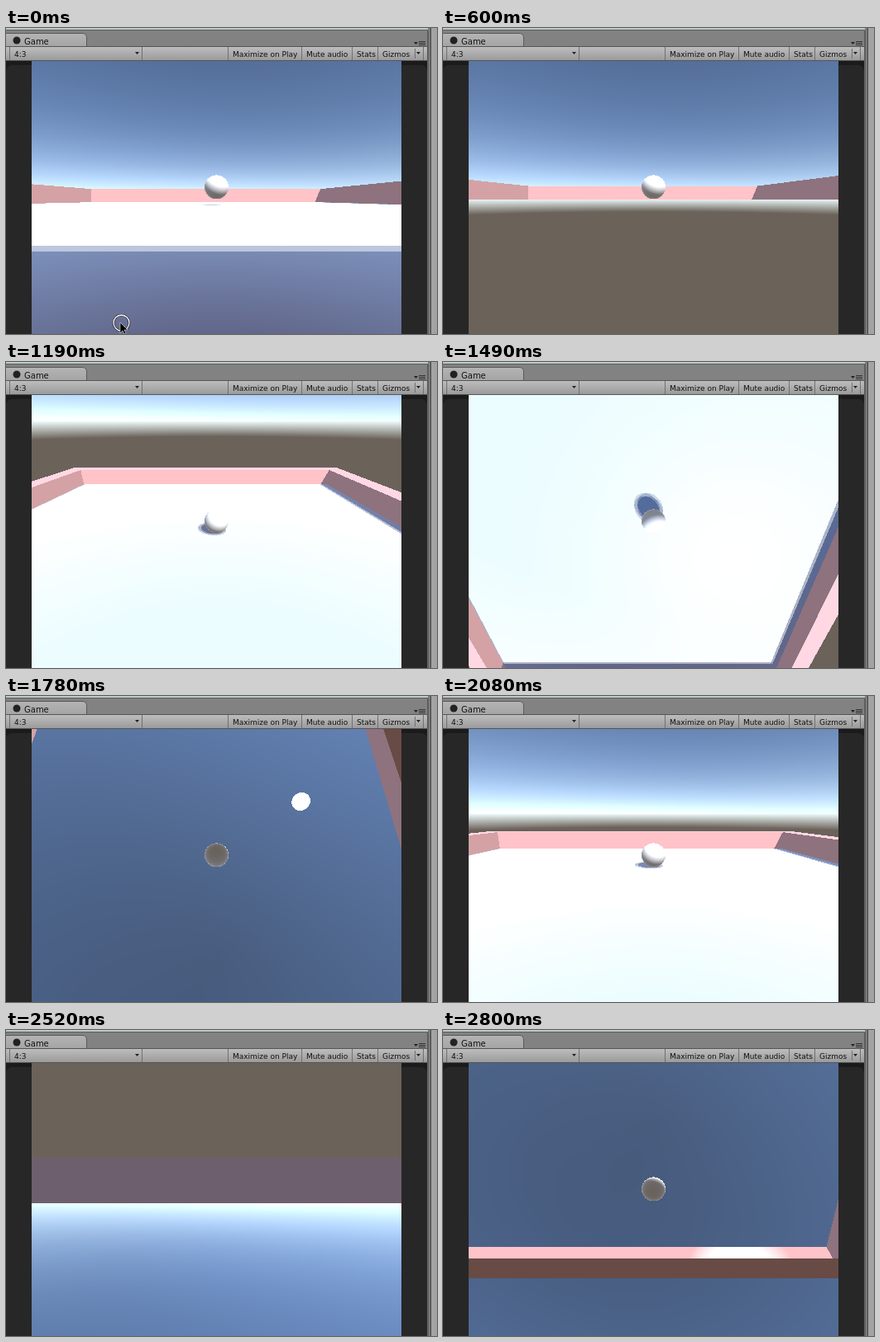
These frames come from a looping animation (521x371 px, 2.85 s). An HTML page with a canvas:

```html
<!DOCTYPE html>
<html lang="en">
<head>
<meta charset="utf-8">
<title>Rolling ball</title>
<style>
html, body { margin: 0; width: 100%; height: 100%; overflow: hidden; background: #262626; }
svg, canvas { position: absolute; left: 0; top: 0; }
canvas { left: 31px; top: 40px; }
text { font: 9px "DejaVu Sans", sans-serif; fill: #111; }
</style>
</head>
<body>
<svg width="521" height="371">
  <defs>
    <linearGradient id="bar" x2="0" y2="1"><stop stop-color="#bdbdbd"/><stop offset="1" stop-color="#9b9b9b"/></linearGradient>
    <linearGradient id="tab" x2="0" y2="1"><stop stop-color="#b4b4b4"/><stop offset="1" stop-color="#a4a4a4"/></linearGradient>
  </defs>
  <rect width="521" height="371" fill="#828282"/>
  <rect width="510" height="2" fill="#bccac5"/>
  <rect y="2" width="510" height="1" fill="#5c5c5c"/>
  <path d="M-1 23V6.500H92Q97.500 6.500 97.500 12V23Z" fill="url(#tab)" stroke="#5a5a5a"/>
  <circle cx="13" cy="15" r="4.500" fill="#222"/>
  <text x="22" y="20" style="font-size:10px">Game</text>
  <path d="M493 17h5l-2.500 3z" fill="#222"/>
  <path d="M499 16.500h8M499 18.500h8M499 20.500h8" stroke="#333"/>
  <rect y="23" width="510" height="16" fill="url(#bar)"/>
  <path d="M0 22.500H510M0 39.500H510" stroke="#555"/>
  <path d="M4.500 23V39M164.500 23V39M268.500 23V39M357.500 23V39M418.500 23V39M449.500 23V39M494.500 25V37M504.500 23V39" stroke="#707070"/>
  <path d="M156 29h5l-2.500 3zM496 29h5l-2.500 3z" fill="#222"/>
  <text x="10" y="35">4:3</text>
  <text x="274" y="35">Maximize on Play</text>
  <text x="363" y="35">Mute audio</text>
  <text x="424" y="35">Stats</text>
  <text x="455" y="35">Gizmos</text>
  <rect y="40" width="510" height="331" fill="#1b1b1b"/>
  <rect y="45" width="509" height="340" rx="7" fill="#272727"/>
  <rect x="509" y="3" width="2" height="368" fill="#5f5f5f"/>
  <rect x="511" width="3" height="371" fill="#7a7a7a"/>
  <rect x="513" width="1" height="371" fill="#444"/>
  <rect x="514" width="7" height="371" fill="#a3a3a3"/>
</svg>
<canvas id="view" width="447" height="331"></canvas>
<svg id="pointer" width="521" height="371">
  <circle cx="139.500" cy="357.500" r="9.500" fill="none" stroke="#222" stroke-width="2.500"/>
  <circle cx="139.500" cy="357.500" r="9.500" fill="none" stroke="#fff" stroke-width="1.300"/>
  <path d="M138 357v13l3-3 2 4 2-1-2-4h4z" fill="#000" stroke="#ddd" stroke-width=".6"/>
</svg>
<script>
// The camera is fixed to the ball, so it tumbles around it as the ball rolls.
const LOOP = 2850, FOCAL = 290, CX = 254.5, CY = 207.5;
const SIDE = 9.1, FAR = 9.1, BACK = -9.55, WALL = 1.05;
const BALL_X = 0.85, RADIUS = 0.5, NEAR = 0.3, BLUR = 0.07;
const SUN = [0.321, 0.766, -0.557];

// start ms, roll in degrees, ball z, height above the floor
const steps = [
  [0, 0, 0.05, 0.24], [150, 0, 0.05, 0], [1040, 4.7, 0.1, 0],
  [1190, 25, 0.5, 0], [1340, 65, 1.2, 0], [1490, 120, 2, 0],
  [1630, 184, 2.4, 0], [1780, 249.3, 2.75, 0], [1930, 311, 3.1, 0],
  [2080, 372.5, 3.54, 0], [2220, 428, 4.2, 0], [2370, 484, 4.9, 0],
  [2520, 540, 5.65, 0], [2670, 596, 5.9, 0], [2800, 648, 6.1, 0]
];

const OUT = SIDE + 1;
const walls = [
  [-OUT, 0, FAR, OUT, WALL, FAR + 1], [-OUT, 0, BACK - 1, OUT, WALL, BACK],
  [-OUT, 0, BACK, -SIDE, WALL, FAR], [SIDE, 0, BACK, OUT, WALL, FAR]
];

const dot = (a, b) => a[0] * b[0] + a[1] * b[1] + a[2] * b[2];
const clamp = x => Math.min(1, Math.max(0, x));
const mix = (a, b, k) => a.map((x, i) => x + (b[i] - x) * k);
const along = (o, d, t) => [o[0] + d[0] * t, o[1] + d[1] * t, o[2] + d[2] * t];
const unit = v => along([0, 0, 0], v, 1 / Math.hypot(v[0], v[1], v[2]));

let ball, enter, leave, axis;

function hitBox(b, o, d) {
  enter = -1e9;
  leave = 1e9;
  for (let i = 0; i < 3; i++) {
    const u = (b[i] - o[i]) / d[i], v = (b[i + 3] - o[i]) / d[i];
    const lo = Math.min(u, v), hi = Math.max(u, v);
    if (lo > enter) { enter = lo; axis = i; }
    if (hi < leave) leave = hi;
  }
  return enter < leave;
}

function hitBall(o, d) {
  const q = along(o, ball, -1), a = dot(d, d), b = dot(q, d);
  const disc = b * b - a * (dot(q, q) - RADIUS * RADIUS);
  return disc < 0 ? -1 : (-b - Math.sqrt(disc)) / a;
}

const inSun = p => hitBall(p, SUN) < 0.001 &&
  !walls.some(w => hitBox(w, p, SUN) && leave > 0.001);

function sky(d) {
  const e = Math.asin(d[1]) * 180 / Math.PI, c = dot(d, SUN);
  if (e < 0) return mix([235, 248, 248], [107, 98, 90], clamp(-e / 3));
  if (c > 0.99946) return [255, 255, 255];
  const k = 1 + 0.22 * c * c, air = Math.exp(-e / 40), haze = Math.exp(-e / 7);
  return [
    (58 + 52 * air + 130 * haze) * k,
    (74 + 74 * air + 120 * haze) * k,
    (100 + 110 * air + 75 * haze) * k
  ];
}

function floorColor(p, d) {
  const steep = -d[1];
  let sun = 0;
  for (const x of [-BLUR, BLUR]) {
    for (const z of [-BLUR, BLUR]) sun += inSun([p[0] + x, 0, p[2] + z]) / 4;
  }
  const shade = steep < 0.5
    ? mix([137, 165, 212], [97, 102, 137], steep * 2)
    : mix([97, 102, 137], [84, 108, 156], clamp(steep * 3 - 1.5));
  const glare = clamp(dot([d[0], steep, d[2]], SUN)) ** 6;
  const tint = clamp((steep - 0.35) * 3) * (1 - glare);
  return mix(shade, [255 - 20 * tint, 255 - 2 * tint, 255], sun);
}

function ballColor(p, d) {
  const n = unit(along(p, ball, -1));
  const rim = 60 * (1 - Math.abs(dot(n, d))) ** 3;
  const light = 215 * Math.max(0, dot(n, SUN)) + rim;
  return mix([105, 98, 92], [135, 145, 165], (n[1] + 1) / 2).map(c => c + light);
}

// Each pair: face seen looking along the positive axis, then the negative one.
const faces = [
  [[142, 114, 126], [212, 162, 165]],
  [[104, 75, 68], [255, 216, 228]],
  [[255, 195, 200], [110, 95, 110]]
];

function wallColor(p, d, ax) {
  const back = d[ax] < 0, color = faces[ax][+back];
  if ((back ? SUN[ax] : -SUN[ax]) <= 0) return color;
  if (!inSun(p)) return faces[0][0];
  const r = d.slice();
  r[ax] *= -1;
  return mix(color, [255, 255, 255], clamp((dot(r, SUN) - 0.98) / 0.011));
}

function trace(o, d) {
  let best = 1e9, kind = 0, face = 0;
  const t = -o[1] / d[1];
  if (o[1] > 1e-6 && t > NEAR) {
    const p = along(o, d, t);
    if (Math.abs(p[0]) < 10 && Math.abs(p[2]) < 10) { best = t; kind = 1; }
  }
  for (const w of walls) {
    if (hitBox(w, o, d) && enter > NEAR && enter < best) {
      best = enter; kind = 2; face = axis;
    }
  }
  const tb = hitBall(o, d);
  if (tb > NEAR && tb < best) { best = tb; kind = 3; }
  const dir = unit(d);
  if (!kind) return sky(dir);
  const p = along(o, d, best);
  return kind === 1 ? floorColor(p, dir) : kind === 2 ? wallColor(p, dir, face) : ballColor(p, dir);
}

const view = document.getElementById('view'), ctx = view.getContext('2d');
const pointer = document.getElementById('pointer');
const cache = [];

function render([, degrees, z, lift]) {
  const a = degrees * Math.PI / 180, s = Math.sin(a), c = Math.cos(a);
  ball = [BALL_X, RADIUS + lift, z];
  const eye = [BALL_X, ball[1] - 0.5 * c + 10 * s, z - 0.5 * s - 10 * c];
  const img = ctx.createImageData(view.width, view.height);
  let k = 0;
  for (let y = 0; y < view.height; y++) {
    const v = (CY - 40.5 - y) / FOCAL;
    for (let x = 0; x < view.width; x++) {
      const u = (x + 31.501 - CX) / FOCAL;
      const rgb = trace(eye, [u, v * c - s, c + v * s]);
      for (let i = 0; i < 3; i++) img.data[k++] = rgb[i];
      img.data[k++] = 255;
    }
  }
  return img;
}

let shown = -1;
function tick() {
  const t = performance.now() % LOOP;
  const i = steps.findLastIndex(s => s[0] <= t);
  if (i !== shown) {
    ctx.putImageData(cache[i] ||= render(steps[i]), 0, 0);
    pointer.style.display = i ? 'none' : '';
    shown = i;
  }
  requestAnimationFrame(tick);
}
tick();
</script>
</body>
</html>
```
